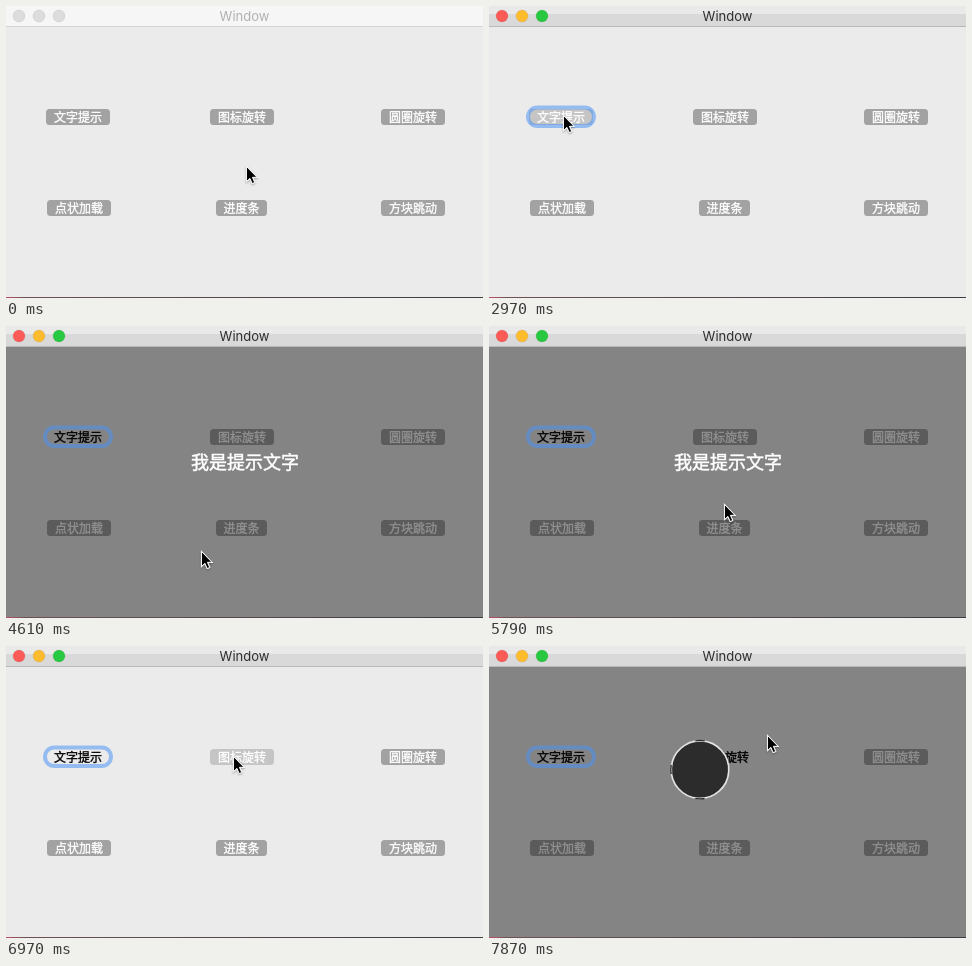
An HTML page with a canvas for the animation above (8 s loop, 477x292 px).

```html
<!DOCTYPE html>
<html lang="zh">
<head>
<meta charset="utf-8">
<title>Window</title>
<style>
html, body { margin: 0; width: 100%; height: 100%; overflow: hidden; background: #ebebeb; }
canvas { display: block; width: 477px; height: 292px; }
</style>
</head>
<body>
<canvas id="stage"></canvas>
<script>
const W = 477, H = 292, LOOP = 8000, STEP = 148.2;
const CJK = '"Noto Sans CJK SC", "Noto Sans CJK", sans-serif';
const canvas = document.getElementById('stage');
const ctx = canvas.getContext('2d');
const dpr = window.devicePixelRatio || 1;
canvas.width = W * dpr;
canvas.height = H * dpr;

const ACTIVE = 20, TIP_ON = 21, TIP_FADE = 39, TIP_OFF = 42, SPIN_ON = 49;
const BUTTONS = [
  { x: 40, y: 103, text: '文字提示', hover: 13, bare: 25 },
  { x: 204, y: 103, text: '图标旋转', hover: 46, bare: 52 },
  { x: 375, y: 103, text: '圆圈旋转' },
  { x: 41, y: 194, text: '点状加载' },
  { x: 210, y: 194, text: '进度条' },
  { x: 375, y: 194, text: '方块跳动' }
];

// Each pointer move curves from the last place towards a bend, if any.
const HOME = [240, 160];
const MOVES = [
  { from: 0, to: 8, bend: [313, 197], end: [136, 114] },
  { from: 8, to: 12, end: [111, 112] },
  { from: 12, to: 14, end: [66, 105] },
  { from: 15, to: 17, end: [74, 109] },
  { from: 24, to: 27, bend: [120, 215], end: [195, 236] },
  { from: 30, to: 31, end: [195, 225] },
  { from: 31, to: 35, bend: [100, 29], end: [360, 130] },
  { from: 35, to: 38, bend: [390, 190], end: [235, 178] },
  { from: 39, to: 42, end: [192, 112] },
  { from: 43, to: 47, bend: [200, 92], end: [227, 110] },
  { from: 50, to: 53, end: [278, 89] }
];

const clamp = v => Math.max(0, Math.min(1, v));
const smooth = v => v * v * (3 - 2 * v);

function pointerAt(n) {
  let place = HOME;
  for (const { from, to, bend, end } of MOVES) {
    if (n <= from) break;
    const t = clamp((n - from) / (to - from));
    place = place.map((p, i) => {
      const mid = bend ? bend[i] : (p + end[i]) / 2;
      return p * (1 - t) ** 2 + 2 * mid * t * (1 - t) + end[i] * t * t;
    });
  }
  return place.map(Math.round);
}

function text(str, x, y, font, color, weight = 0) {
  ctx.font = font;
  ctx.textAlign = 'center';
  ctx.fillStyle = ctx.strokeStyle = color;
  ctx.fillText(str, x, y);
  if (weight) {
    ctx.lineWidth = weight;
    ctx.strokeText(str, x, y);
  }
}

function box(x, y, w, h, r) {
  ctx.beginPath();
  ctx.roundRect(x, y, w, h, r);
}

function disc(x, y, r, color) {
  ctx.beginPath();
  ctx.arc(x, y, r, 0, Math.PI * 2);
  ctx.fillStyle = color;
  ctx.fill();
}

function titleBar(active) {
  ctx.fillStyle = active ? '#e9e9e9' : '#f6f6f6';
  ctx.fillRect(0, 0, W, 20);
  if (active) {
    ctx.fillStyle = '#d9d9d9';
    ctx.fillRect(0, 8, W, 12);
  }
  ctx.fillStyle = active ? '#b9b9b9' : '#d6d6d6';
  ctx.fillRect(0, 20, W, 1);
  ['#fc5b57', '#fdbc2e', '#28c840'].forEach((color, i) => {
    const x = 13 + 20 * i;
    disc(x, 10, 6, active ? color : '#dcdcdc');
    ctx.lineWidth = 0.7;
    ctx.strokeStyle = 'rgba(0,0,0,0.1)';
    ctx.stroke();
  });
  text('Window', 238.5, 15, '13px Inter, sans-serif', active ? '#2e2e2e' : '#b1b1b1');
}

function button(b, n) {
  const bare = n >= b.bare;
  const w = b.text.length * 13 + 12;
  if (!bare) {
    box(b.x, b.y, w, 16, 3.5);
    ctx.fillStyle = n >= b.hover ? '#c5c5c5' : '#a2a2a2';
    ctx.fill();
  }
  text(b.text, b.x + w / 2, b.y + 13, '12px ' + CJK, bare ? '#000' : '#fff', 0.35);
}

function focusRing() {
  box(39, 101.5, 66, 18.5, 9.25);
  ctx.lineWidth = 4;
  ctx.strokeStyle = 'rgba(75,147,245,0.53)';
  ctx.stroke();
}

// The icon turns about its lower left corner.
function spinner(angle) {
  ctx.save();
  ctx.translate(208.5, 166);
  ctx.rotate(-angle);
  ctx.translate(30, -30);
  disc(0, 0, 29.4, '#2c2c2c');
  ctx.beginPath();
  ctx.arc(0, 0, 28.8, 0, Math.PI * 2);
  ctx.lineWidth = 1.7;
  ctx.strokeStyle = '#e4e4e4';
  ctx.stroke();
  // The ring is cut off where it meets the edges of the icon.
  ctx.lineWidth = 1.3;
  ctx.strokeStyle = '#303030';
  for (let i = 0; i < 3; i++) {
    const mid = 2.3 + i * Math.PI / 2;
    ctx.beginPath();
    ctx.arc(0, 0, 29.2, mid - 0.16, mid + 0.16);
    ctx.stroke();
  }
  ctx.restore();
}

function pointer(x, y) {
  ctx.save();
  ctx.translate(x + 0.5, y + 0.5);
  const shape = new Path2D('M0 0V15L3.4 11.8L5.7 17L8.2 16L5.9 10.8H10.5Z');
  ctx.shadowColor = 'rgba(0,0,0,0.35)';
  ctx.shadowBlur = 2 * dpr;
  ctx.shadowOffsetY = dpr;
  ctx.lineWidth = 1.2;
  ctx.strokeStyle = '#fff';
  ctx.stroke(shape);
  ctx.shadowColor = 'transparent';
  ctx.fillStyle = '#000';
  ctx.fill(shape);
  ctx.lineWidth = 0.9;
  ctx.stroke(shape);
  ctx.restore();
}

function desktopEdge() {
  const edge = ctx.createLinearGradient(0, 0, W, 0);
  edge.addColorStop(0, '#c4506a');
  edge.addColorStop(0.04, '#6b5258');
  edge.addColorStop(1, '#3c3c40');
  ctx.fillStyle = edge;
  ctx.fillRect(0, 291, W, 1);
}

function draw(n) {
  ctx.setTransform(dpr, 0, 0, dpr, 0, 0);
  ctx.fillStyle = '#ebebeb';
  ctx.fillRect(0, 0, W, H);
  titleBar(n >= ACTIVE);
  BUTTONS.forEach(b => button(b, n));

  const faded = smooth(clamp((n - TIP_FADE) / (TIP_OFF - TIP_FADE)));
  const tip = n < TIP_ON ? 0 : 1 - faded;
  const spinning = n >= SPIN_ON;
  ctx.fillStyle = `rgba(0,0,0,${0.44 * (spinning ? 1 : tip)})`;
  ctx.fillRect(0, 21, W, 270);
  if (n >= ACTIVE) focusRing();
  if (tip) {
    ctx.globalAlpha = tip;
    text('我是提示文字', 239, 143, '18px ' + CJK, '#fff', 0.5);
    ctx.globalAlpha = 1;
  }
  if (spinning) spinner((n - SPIN_ON) * 10.4 * Math.PI / 180);
  desktopEdge();
  pointer(...pointerAt(n));
}

const start = performance.now();
function tick() {
  draw(Math.floor((performance.now() - start) % LOOP / STEP));
  requestAnimationFrame(tick);
}
tick();
</script>
</body>
</html>
```
